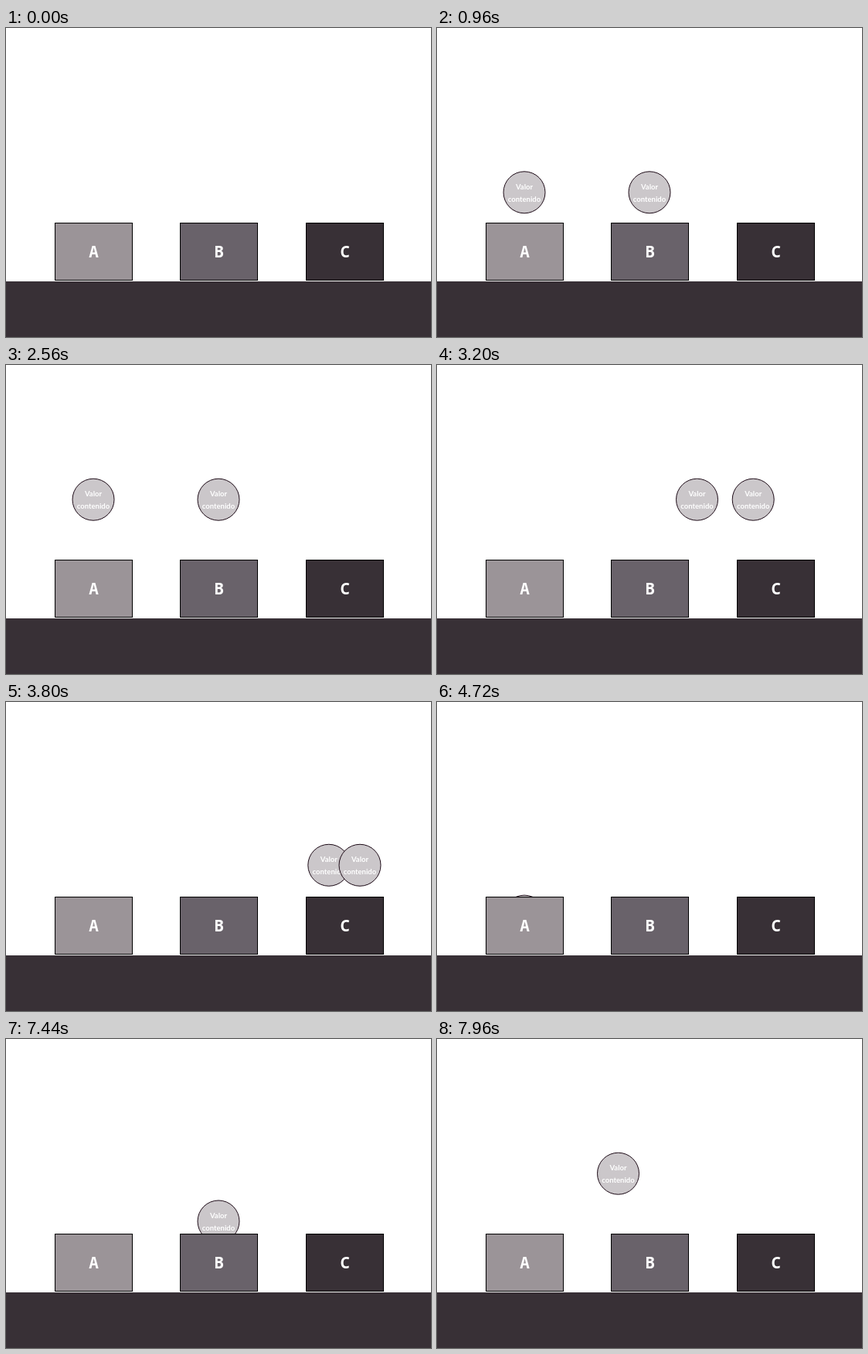
Recreate the animation shown at these times as an HTML page. Size 550 by 400 pixels, loop 8000 ms.

```html
<!DOCTYPE html>
<html lang="es">
<head>
<meta charset="utf-8">
<style>
  html, body { margin: 0; width: 100%; height: 100%; overflow: hidden; background: #fff; }
  svg { display: block; }
  text { fill: #fff; font: bold 9.5px Lato, sans-serif; text-anchor: middle; }
  .name { font: bold 21px "Noto Sans Mono", monospace; }
  .box, circle { stroke: #000; }
  circle { fill: #cbc7ca; stroke: #1c0a16; }
</style>
</head>
<body>
<svg width="550" height="400" viewBox="0 0 550 400">
  <defs>
    <g id="value">
      <circle r="27"/>
      <text y="-4">Valor</text>
      <text y="12">contenido</text>
    </g>
  </defs>
  <use id="a" href="#value"/>
  <use id="b" href="#value"/>
  <path id="plus" d="M198.5 156V195M179 175.5H218" stroke="#383036" stroke-width="9"/>
  <rect y="328" width="550" height="72" fill="#383036"/>
  <g class="box">
    <rect x="63.5" y="252.5" width="100" height="74" fill="#9b9498"/>
    <rect x="225.5" y="252.5" width="100" height="74" fill="#69626a"/>
    <rect x="388.5" y="252.5" width="100" height="74" fill="#383036"/>
  </g>
  <text class="name" x="113.5" y="297">A</text>
  <text class="name" x="275.5" y="297">B</text>
  <text class="name" x="438.8" y="297">C</text>
  <text id="empty" x="113.3" y="316">(Vacía)</text>
</svg>
<script>
const LOOP = 8000, STEP = 40;
const INSIDE = 290, ABOVE = 174.2, A = 113, B = 275;
const [a, b, plus, empty] = ['a', 'b', 'plus', 'empty'].map(id => document.getElementById(id));

// 0 before start, 1 after end, linear between
const ramp = (t, start, end) => Math.min(1, Math.max(0, (t - start) / (end - start)));
const mix = (from, to, k) => from + (to - from) * k;
const place = (el, x, y) => el.setAttribute('transform', `translate(${x} ${y})`);
const fade = (el, k) => el.setAttribute('opacity', k);

function draw(t) {
  const sum = t < 4400;                       // both values travel to C, then A and B act alone
  const lift = sum ? ramp(t, 560, 1160) - ramp(t, 3640, 4140) : 0;
  const travel = ramp(t, 2760, 3360);
  const height = k => mix(INSIDE, ABOVE, k);

  if (sum) {
    place(a, mix(A, 417.8, travel), height(lift));
    place(b, mix(B, 458, travel), height(lift));
  } else {
    place(a, A, height(ramp(t, 4680, 5040)));
    place(b, mix(B, A, ramp(t, 7760, 8560)), height(ramp(t, 7160, 7760)));
  }
  fade(a, 1 - ramp(t, 5320, 5840));
  fade(plus, ramp(t, 1520, 1840) - ramp(t, 2240, 2560));
  fade(empty, ramp(t, 5960, 6200) - ramp(t, 6760, 7000));
}

const begin = performance.now();
function tick() {
  const t = (performance.now() - begin) % LOOP;
  draw(Math.floor(t / STEP) * STEP);
  requestAnimationFrame(tick);
}
tick();
</script>
</body>
</html>
```
